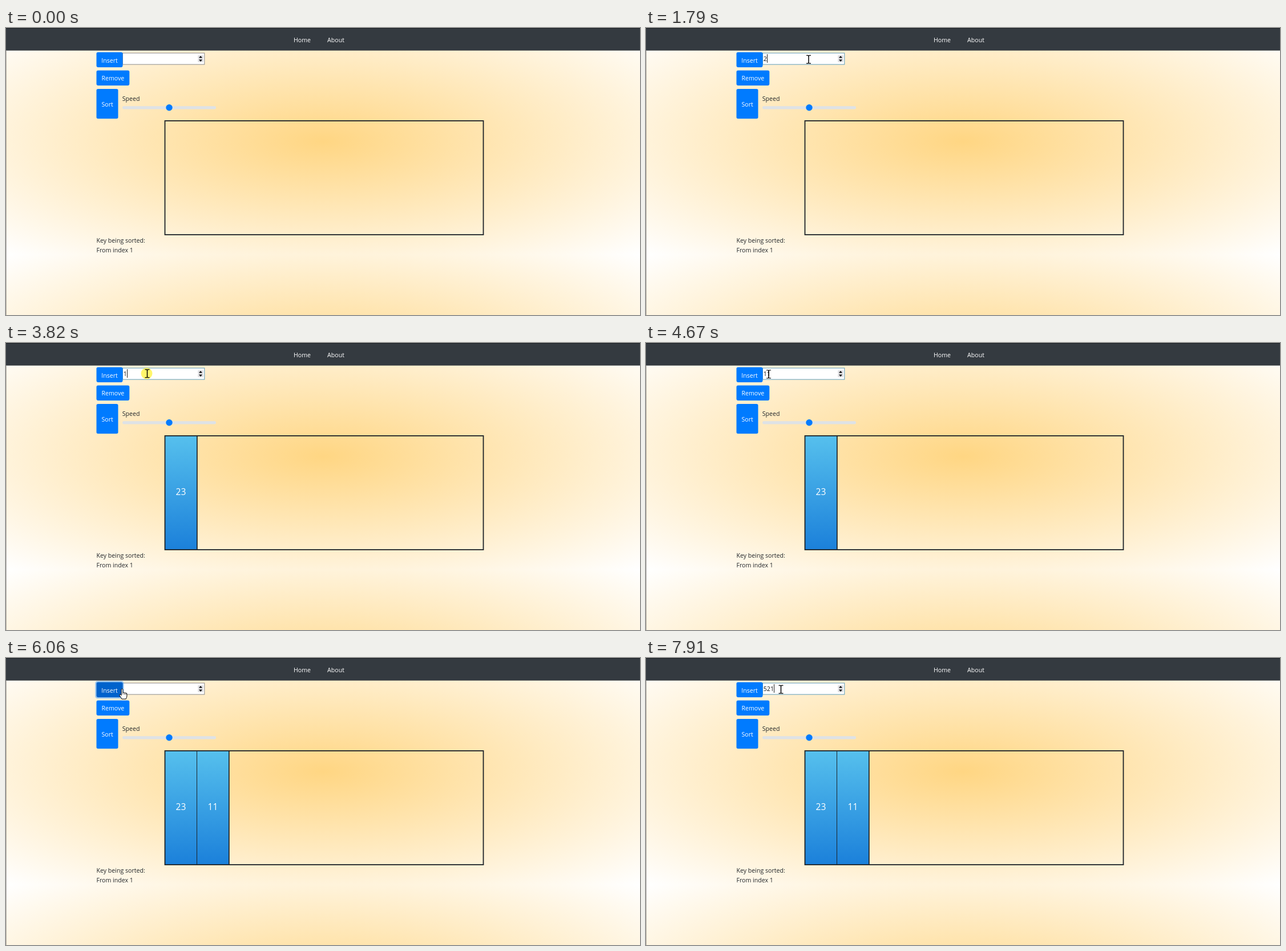
Write an HTML page with a canvas that moves like this. It is 1111 px wide and 504 px high and loops after 7990 ms.

```html
<!DOCTYPE html>
<html lang="en">
<head>
<meta charset="utf-8">
<title>Insertion sort</title>
<style>
  html, body { margin: 0; width: 100%; height: 100%; overflow: hidden; background: #fff; }
  canvas { display: block; width: 1111px; height: 504px; }
</style>
</head>
<body>
<canvas id="stage" width="1111" height="504"></canvas>
<script>
const W = 1111, H = 504, LOOP = 7990;
const ctx = document.getElementById('stage').getContext('2d');
const FONT = '"Open Sans", "Noto Sans", sans-serif';

// Pointer hops: start, end, steps, target x, target y
const moves = [
  [150, 150, 1, 774, 312],
  [230, 230, 1, 700, 263],
  [460, 930, 7, 354, 82],
  [1150, 1380, 4, 285, 55],
  [2480, 2870, 6, 198.5, 53],
  [3280, 3500, 4, 247.5, 53.5],
  [4280, 4840, 8, 200, 55],
  [5210, 5520, 5, 268.5, 53],
  [5600, 5900, 5, 203.5, 54],
  [6430, 6740, 5, 248, 54],
  [7840, 7910, 2, 236.5, 55]
];
const typed = [[0, ''], [1790, '2'], [1930, '23'], [3100, ''], [3820, '1'], [3970, '11'],
  [6060, ''], [7120, '5'], [7290, '52'], [7360, '521']];
const bars = [[3100, '23'], [6060, '11']];
const fieldFocus = [[1610, 2950], [3670, 5900], [6820, LOOP]];
const caretOn = [[1610, 2180], [2710, 2950], [3670, 4200], [4770, 5290], [5830, 5900], [6820, 7440], [7910, LOOP]];
const clicks = [[1610, 1790], [2950, 3180], [3670, 3890], [5900, 6060], [6820, 6970]];
const pressed = [[2920, 3070], [5910, 6070]];
const buttonFocus = [[2960, 3670], [5950, 6820]];

const within = (spans, t) => spans.some(([a, b]) => t >= a && t < b);
const ease = k => k * k * (3 - 2 * k);
const mix = (a, b, k) => a + (b - a) * k;

// Share of the last 150 ms in which a state held, like a CSS transition
function faded(test, t) {
  let n = 0;
  for (let i = 0; i < 10; i++) if (test(t - i * 15)) n++;
  return n / 10;
}

function pointer(t) {
  let pos = null;
  for (const [start, end, steps, x, y] of moves) {
    if (t < start) break;
    const gap = steps > 1 ? (end - start) / (steps - 1) : 1;
    const k = ease(Math.min(1, (Math.floor((t - start + 5) / gap) + 1) / steps));
    pos = pos ? { x: mix(pos.x, x, k), y: mix(pos.y, y, k) } : { x, y };
  }
  return pos;
}

const inField = p => p && p.x > 204.5 && p.x < 348 && p.y > 43 && p.y < 64;
const inButton = p => p && p.x >= 158 && p.x <= 204.5 && p.y > 42 && p.y < 69;

function box(x, y, w, h, r, fill) {
  ctx.fillStyle = fill;
  ctx.beginPath();
  ctx.roundRect(x, y, w, h, r);
  ctx.fill();
}

function disc(x, y, r, fill) {
  ctx.fillStyle = fill;
  ctx.beginPath();
  ctx.arc(x, y, r, 0, Math.PI * 2);
  ctx.fill();
}

function label(text, x, y, fill = '#212529', size = 10.6, align = 'left') {
  ctx.font = size + 'px ' + FONT;
  ctx.textAlign = align;
  ctx.fillStyle = fill;
  ctx.fillText(text, x, y);
}

function glow(top, height) {
  ctx.save();
  ctx.beginPath();
  ctx.rect(0, top, W, height);
  ctx.clip();
  ctx.translate(W / 2, top + height / 2);
  ctx.scale(W / Math.SQRT2, height / Math.SQRT2);
  const g = ctx.createRadialGradient(0, 0, 0, 0, 0, 1);
  g.addColorStop(0, '#ffd683');
  g.addColorStop(1, '#fff');
  ctx.fillStyle = g;
  ctx.fillRect(-1, -1, 2, 2);
  ctx.restore();
}

function page() {
  glow(0, 398);
  glow(398, 398);
  ctx.fillStyle = 'rgba(90,85,80,.45)';
  ctx.fillRect(0, 40, 1, H);
  ctx.fillStyle = '#343a40';
  ctx.fillRect(0, 0, W, 39.6);
  ctx.fillStyle = '#1c2024';
  ctx.fillRect(0, 0, W, 1);
  label('Home', 519, 25, '#fff', 10.6, 'center');
  label('About', 578, 25, '#fff', 10.6, 'center');

  box(158.5, 74.6, 57.8, 26.3, 2.8, '#007bff');
  label('Remove', 187.4, 92, '#fff', 10.6, 'center');
  box(158.5, 107, 38, 52.3, 2.8, '#007bff');
  label('Sort', 177.6, 137.5, '#fff', 10.6, 'center');

  label('Speed', 203.8, 128);
  box(204, 137.2, 164, 5.2, 2.6, '#dee2e6');
  disc(286, 139.8, 5.7, '#007bff');
  label('Key being sorted:', 158.5, 377);
  label('From index 1', 158.5, 394);
}

function insertButton(t) {
  const ring = faded(s => within(buttonFocus, s), t);
  if (ring) box(156.2, 40.2, 50.4, 31, 4.5, `rgba(90,170,250,${0.75 * ring})`);
  const hover = faded(s => inButton(pointer(s)), t);
  const down = faded(s => within(pressed, s), t);
  const g = mix(mix(123, 105, hover), 98, down);
  const b = mix(mix(255, 217, hover), 204, down);
  box(158.5, 42.5, 46, 26.4, 2.8, `rgb(0,${g},${b})`);
  label('Insert', 181.5, 60.6, '#fff', 10.5, 'center');
}

function spinner() {
  for (const [y, dir] of [[48, -1], [54.3, 1]]) {
    box(336.2, y, 9.6, 5.8, 1, '#dfdfe2');
    const mid = y + 2.9;
    ctx.fillStyle = '#000';
    ctx.beginPath();
    ctx.moveTo(338, mid - dir * 1.6);
    ctx.lineTo(344, mid - dir * 1.6);
    ctx.lineTo(341, mid + dir * 1.9);
    ctx.fill();
  }
}

function field(t, p) {
  const border = within(fieldFocus, t) ? '#5b9cba' : inField(p) ? '#444' : '#8a8a8a';
  box(204, 43.5, 144.3, 21, 0, border);
  box(205, 44.5, 142.3, 19, 0, '#fff');
  spinner();
  const text = typed.filter(e => e[0] <= t).pop()[1];
  label(text, 205.8, 58.3, '#111');
  if (within(caretOn, t)) box(206 + 6 * text.length, 46, 1, 15, 0, '#222');
}

function array(t) {
  const line = '#1b2227';
  bars.filter(e => e[0] <= t).forEach(([, text], i) => {
    const x = 279 + 56 * i;
    const g = ctx.createLinearGradient(0, 163, 0, 363);
    g.addColorStop(0, '#56c0ed');
    g.addColorStop(1, '#1b80da');
    ctx.fillStyle = g;
    ctx.fillRect(x, 163, 56, 200);
    ctx.fillStyle = line;
    ctx.fillRect(x + 55, 163, 1.7, 200);
    label(text, x + 27.4, 266.8, '#fff', 15.6, 'center');
  });
  ctx.strokeStyle = line;
  ctx.lineWidth = 1.8;
  ctx.strokeRect(278.5, 163, 558, 200);
}

function outline(d) {
  const shape = new Path2D(d);
  ctx.fillStyle = '#fff';
  ctx.strokeStyle = '#000';
  ctx.lineWidth = 1;
  ctx.lineJoin = 'round';
  ctx.fill(shape);
  ctx.stroke(shape);
}

function beam() {
  ctx.strokeStyle = '#000';
  ctx.lineWidth = 1.5;
  ctx.stroke(new Path2D('M0 -6.5V7'));
  ctx.lineWidth = 1.2;
  ctx.stroke(new Path2D('M-4 -6.8H-1L0 -6L1 -6.8H4M-4 7.2H-1L0 6.4L1 7.2H4'));
}

function hand() {
  outline('M-1.4 1Q0 -.8 1.4 1V7Q2.8 5.6 4 7.2Q5.4 6.2 6.4 7.8Q8 7 8.4 9V13' +
    'Q8 15.5 6.6 18H-.6Q-1.6 15.6 -4.6 11.8Q-5 9.4 -3 10L-1.4 11.6Z');
  ctx.lineWidth = 0.7;
  ctx.stroke(new Path2D('M1.4 7V10M4 7.4V10.4M6.4 8V10.8'));
}

function cursor(t, p) {
  if (within(clicks, t)) disc(p.x - 1, p.y, 10, 'rgba(255,240,0,.58)');
  ctx.save();
  ctx.translate(p.x, p.y);
  if (inField(p)) beam();
  else if (inButton(p)) hand();
  else outline('M.5 .5V14.2L3.7 11.2L5.8 16.2L8 15.2L5.9 10.5H10.3Z');
  ctx.restore();
}

function draw(t) {
  const p = pointer(t);
  ctx.clearRect(0, 0, W, H);
  page();
  field(t, p);
  insertButton(t);
  array(t);
  if (p) cursor(t, p);
}

const begin = performance.now();
function tick() {
  draw((performance.now() - begin) % LOOP);
  requestAnimationFrame(tick);
}
tick();
</script>
</body>
</html>
```
